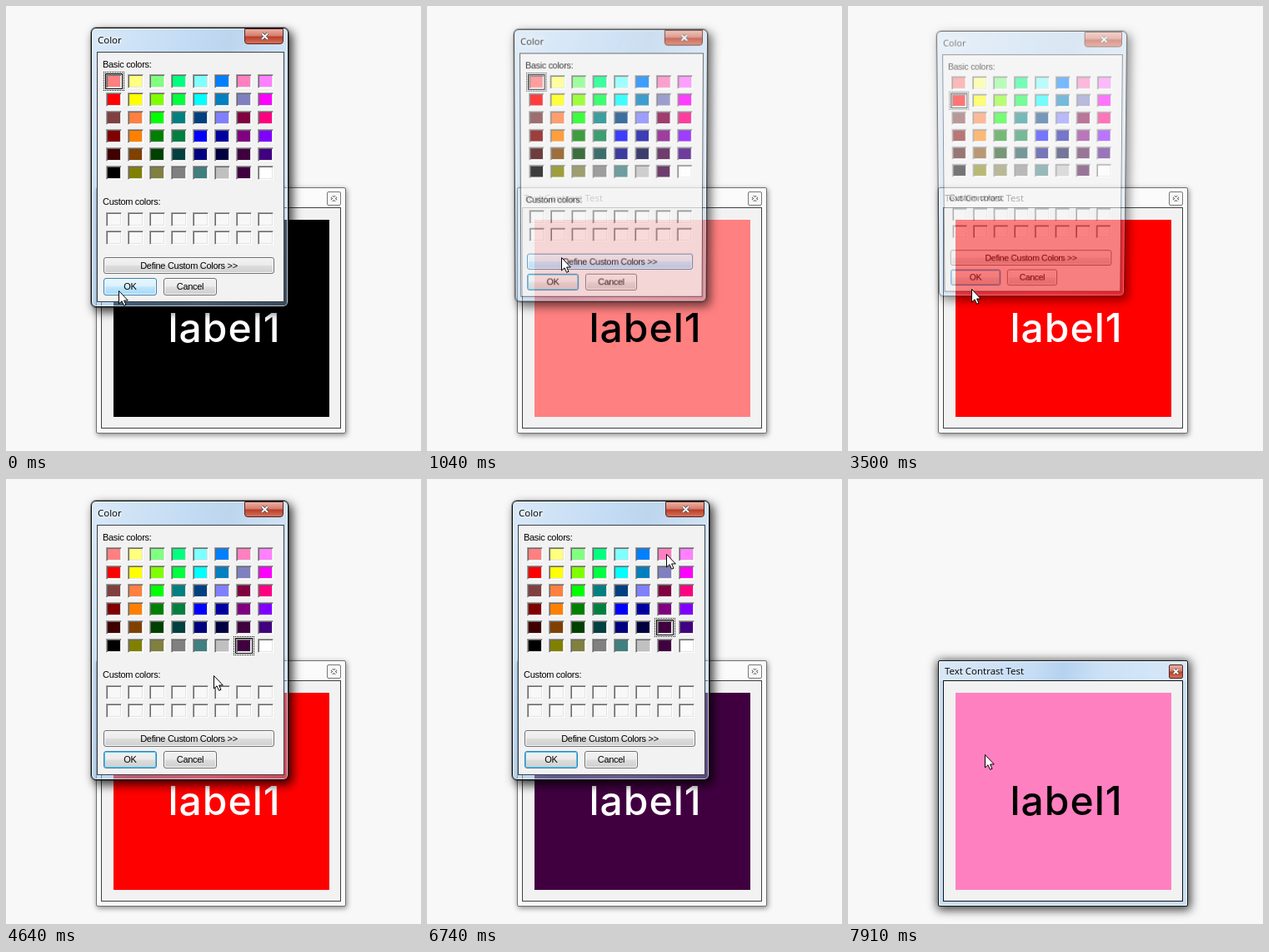
Animation, 498 px wide and 535 px high, one loop 8 s. Source, as an HTML page:

```html
<!DOCTYPE html>
<html>
<head>
<meta charset="utf-8">
<style>
html, body { margin: 0; width: 100%; height: 100%; overflow: hidden; background: #f8f8f8; }
div { position: absolute; box-sizing: border-box; white-space: nowrap; }
svg { position: absolute; left: 0; top: 0; overflow: visible; }
#stage { width: 498px; height: 535px; overflow: hidden; font: 11px/11px "Liberation Sans", Arial, sans-serif; letter-spacing: -.3px; }
.title { font: 11.5px/12px "Open Sans", "Noto Sans", sans-serif; letter-spacing: 0; }
.label { font: 500 48px/48px Inter, Arial, sans-serif; letter-spacing: 1px; }
.form { border: 1px solid #707070; border-radius: 2px; background: #fbfbfb; box-shadow: 1px 2px 6px rgba(0,0,0,.45); }
.form.active { border-color: #101418; box-shadow: 1px 2px 12px 2px rgba(0,0,0,.75), inset 0 0 0 1px #eef6fd;
  background: linear-gradient(100deg, #dbe8f6 0, #c6ddf5 38%, #b5d2f0 50%, #cce1f7 65%, #d8e8f8) 0 0 / 100% 24px no-repeat, #c9def3; }
.dialog { border: 1px solid #080c10; border-radius: 6px;
  box-shadow: 0 0 0 1px rgba(0,0,0,.35), 4px 5px 12px 1px rgba(0,0,0,.75), inset 0 0 0 1px rgba(255,255,255,.65);
  background: linear-gradient(110deg, rgba(190,220,248,.55) 0, rgba(150,195,240,.55) 35%, rgba(130,180,228,.5) 48%, rgba(165,205,245,.45) 70%, rgba(140,185,230,.4)); }
.client { background: #f2f2f2; border: 1px solid #3a4046; }
.active ~ .client { border-color: #101418; }
.close { border: 1px solid #777; border-radius: 2px; background: #f8f8f8; }
.red { border-color: #5a2420; background: linear-gradient(#e8b0a4, #d47a6a 48%, #b83c28 52%, #d4735c); }
.cell { border: 1px solid; border-color: #a0a0a0 #fff #fff #a0a0a0; box-shadow: inset 1px 1px #696969, inset -1px -1px #e3e3e3; }
.ring { border: 1px dotted #000; }
.ring div { inset: 1px; border: 1px solid #000; }
.button { border: 1px solid #707070; border-radius: 3px; text-align: center; box-shadow: inset 0 0 0 1px #fafafa;
  background: linear-gradient(#f2f2f2, #ebebeb 49%, #ddd 51%, #cfcfcf); }
.button.default { border-color: #3c7fb1; box-shadow: inset 0 0 0 1px #48c8ee; }
.button.hover { border-color: #3c7fb1; box-shadow: inset 0 0 0 1px #f0faff; background: linear-gradient(#eaf6fd, #d9f0fc 49%, #bee6fd 51%, #a7d9f5); }
</style>
</head>
<body>
<div id="stage"></div>
<script>
const stage = document.getElementById("stage");

function box(parent, cls, x, y, w, h, text = "") {
  const el = document.createElement("div");
  el.className = cls;
  el.style.cssText = `left:${x}px;top:${y}px;` + (w ? `width:${w}px;height:${h}px` : "");
  el.textContent = text;
  parent.append(el);
  return el;
}

function cross(el, x, y, r) {
  const d = `M${x - r} ${y - r}L${x + r} ${y + r}M${x + r} ${y - r}L${x - r} ${y + r}`;
  el.innerHTML = `<svg width="1" height="1" fill="none"><path d="${d}" stroke="#555" stroke-width="3.6"/><path d="${d}" stroke="#fff" stroke-width="2"/></svg>`;
}

// Main window
const form = box(stage, "form", 108, 218, 300, 296);
const formTitle = box(stage, "title", 116, 224.5, 0, 0, "Text Contrast Test");
const formClose = box(stage, "close", 385, 223, 17, 17);
cross(formClose, 7.5, 7.5, 2.6);
box(stage, "client", 114, 242, 288, 266);
const panel = box(stage, "", 129, 257, 259, 237);
const label = box(stage, "label", 194.5, 362.5, 0, 0, "label1");

// Color dialog
const dialog = box(stage, "", 0, 0, 498, 535);
dialog.style.transformOrigin = "220.5px 194px";
box(dialog, "dialog", 102, 26, 237, 336);
box(dialog, "title", 110, 34.5, 0, 0, "Color").style.textShadow = "0 0 6px #fff, 0 0 6px #fff";
const dialogClose = box(dialog, "close red", 286, 27, 47, 19);
dialogClose.style.borderRadius = "0 0 4px 4px";
cross(dialogClose, 23.5, 8.5, 3.4);
box(dialog, "client", 109, 55, 225, 301);
box(dialog, "", 116, 65, 0, 0, "Basic colors:");
box(dialog, "", 116, 230, 0, 0, "Custom colors:");

// Palette: one hex digit per channel, on a coarse scale
const hex = v => Math.min(255, v).toString(16).padStart(2, "0");
const toColor = code => "#" + [...code].map(d => d === "F" ? "ff" : d + "0").join("").toLowerCase();
const channels = color => [1, 3, 5].map(i => parseInt(color.slice(i, i + 2), 16));
const halve = color => "#" + channels(color).map(v => hex(Math.round(v / 128) * 64)).join("");
const row = codes => codes.split(" ").map(toColor);
const deep = row("800 F80 080 084 00F 00A 808 80F");
const colors = [
  row("F88 FF8 8F8 0F8 8FF 08F F8C F8F"),
  row("F00 FF0 8F0 0F4 0FF 08C 88C F0F"),
  row("844 F84 0F0 088 048 88F 804 F08"),
  deep,
  deep.map(halve),
  row("000 880 884 888 488 CCC 404 FFF")
].flat();

const cellX = i => 120 + i % 8 * 26, cellY = i => 82 + (i >> 3) * 22;
colors.forEach((c, i) => box(dialog, "cell", cellX(i), cellY(i), 19, 17).style.background = c);
for (let i = 0; i < 16; i++) box(dialog, "cell", cellX(i), cellY(i) + 166, 19, 17).style.background = "#f8f8f8";
const ring = box(dialog, "ring", 0, 0, 25, 23);
box(ring, "", 1, 1).style.cssText = "";

function button(x, y, w, h, text, idle) {
  const el = box(dialog, "", x, y, w, h, text);
  el.style.lineHeight = h - 2 + "px";
  return (px, py, live) => {
    const hover = live && px >= x && px < x + w && py >= y && py < y + h;
    el.className = "button " + (hover ? "hover" : idle);
  };
}
const buttons = [
  button(117, 302, 205, 20, "Define Custom Colors >>", ""),
  button(117, 327, 64, 21, "OK", "default"),
  button(189, 327, 64, 21, "Cancel", "")
];

const cursor = box(stage, "", 0, 0, 12, 19);
cursor.innerHTML = '<svg width="12" height="19"><path d="M.5 .5V16L4 12.8 6.6 18.3 9 17.3 6.6 12H11.3Z" fill="#fff" stroke="#000"/></svg>';

// Each round: click the label, pick a cell, press OK
const rounds = [
  { open: -1500, close: 100, pick: 0, from: [135, 342], ok: [135, 342] },
  { open: 977, close: 2640, pick: 8, from: [161, 302], ok: [140, 341] },
  { open: 3418, close: 5100, pick: 46, from: [148, 340], ok: [140, 340] },
  { open: 5830, close: 7580, pick: 6, from: [160, 330], ok: [164, 331] }
];
const LOOP = 8000, STEP = 134, LEAD = 60, PICKED = .57;

const clamp = v => Math.max(0, Math.min(1, v));
function glide(a, b, k) {
  const e = clamp(k) ** 2 * (3 - 2 * clamp(k));
  return a.map((v, i) => Math.round(v + (b[i] - v) * e));
}

function cursorAt(t, r, next) {
  const p = (t - r.open) / (r.close - r.open);
  const cell = [cellX(r.pick) + 11, cellY(r.pick) + 8];
  if (p < PICKED) return glide(r.from, cell, (p - .1) / .38);
  if (p < 1) return glide(cell, r.ok, (p - .67) / .26);
  return next ? glide(r.ok, next.from, (t - r.close - 250) / 450) : r.ok;
}

function draw(now) {
  const t = Math.floor((now % LOOP + LEAD) / STEP) * STEP;
  const n = rounds.findLastIndex(r => r.open <= t);
  const r = rounds[n];
  const open = t < r.close;
  const hidden = open ? clamp(1 - (t - r.open) / 125) : clamp((t - r.close) / 300);

  dialog.style.visibility = hidden > .98 ? "hidden" : "visible";
  dialog.style.opacity = 1 - hidden;
  dialog.style.transform = hidden
    ? `translateY(${-5 * hidden}px) perspective(1000px) rotateX(${-10 * hidden}deg) scale(${1 - .1 * hidden})` : "none";

  const before = n ? colors[rounds[n - 1].pick] : "#000000";
  const fill = open ? before : colors[r.pick];
  const [red, green, blue] = channels(fill);
  panel.style.background = fill;
  label.style.color = .3 * red + .59 * green + .11 * blue > 128 ? "#000" : "#fff";
  form.classList.toggle("active", !open);
  formClose.classList.toggle("red", !open);
  formTitle.style.color = open ? "#555" : "#000";

  const picked = t > r.open + PICKED * (r.close - r.open);
  const focus = picked ? r.pick : colors.indexOf(before);
  ring.style.left = cellX(focus) - 3 + "px";
  ring.style.top = cellY(focus) - 3 + "px";

  const [x, y] = cursorAt(t, r, rounds[n + 1]);
  cursor.style.left = x + "px";
  cursor.style.top = y + "px";
  buttons.forEach(update => update(x, y, hidden < .3));
}

const start = performance.now();
function tick() {
  draw(performance.now() - start);
  requestAnimationFrame(tick);
}
tick();
</script>
</body>
</html>
```
